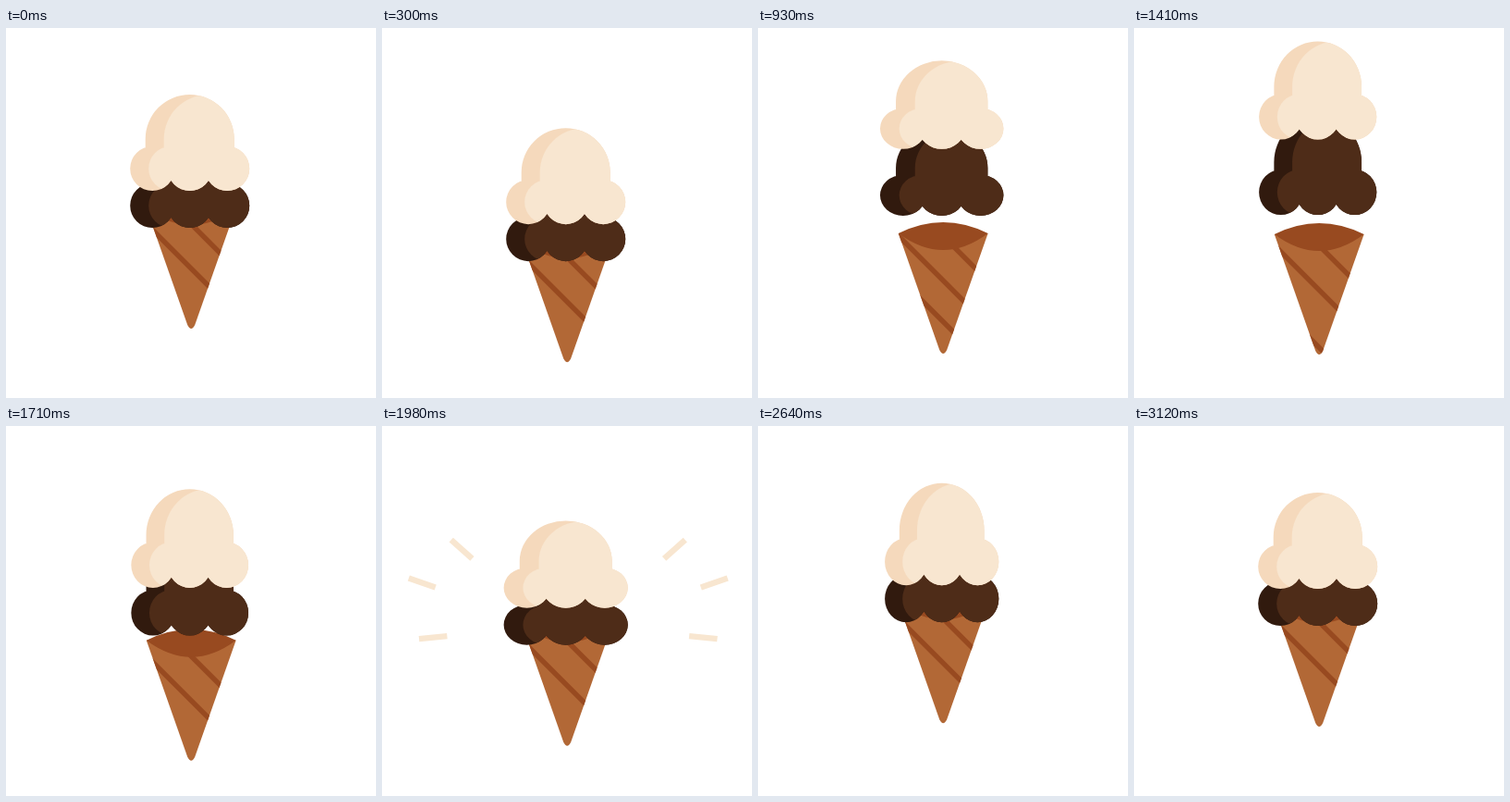
Recreate the animation shown at these times as an HTML page with a canvas. Size 400 px wide and 400 px high, loop 3180 ms.

```html
<!DOCTYPE html>
<html lang="en">
<head>
<meta charset="utf-8">
<title>Ice cream</title>
<style>
  html, body { margin: 0; width: 100%; height: 100%; overflow: hidden; background: #fff; }
  canvas { display: block; width: 400px; height: 400px; }
</style>
</head>
<body>
<canvas id="stage" width="400" height="400"></canvas>
<script>
const ctx = document.getElementById('stage').getContext('2d');
const LOOP = 3180, STEP = 30, LAST = 3120;
const LAUNCH = 660, LAND = 1815;

const VANILLA = { light: '#f8e6d0', shade: '#f5d9bc', rest: 149, height: 86, hang: 2.9 };
const CHOCOLATE = { light: '#4e2c18', shade: '#311a0e', rest: 109, height: 42, hang: 4.9 };
const WAFER = '#b26836', WAFER_DARK = '#984a20';

function ease(t, from, to) {
  const u = Math.min(1, Math.max(0, (t - from) / (to - from)));
  return u * u * (3 - 2 * u);
}

// A value that drifts by eased, possibly overlapping moves: [from, to, change]
const glide = (value, ...moves) => t =>
  moves.reduce((sum, [from, to, change]) => sum + change * ease(t, from, to), value);

const coneTip = glide(325,
  [0, 540, 62], [560, 785, -35], [1370, 1590, 11], [1632, 2432, -43], [2432, 3050, 5]);
const squash = glide(0,
  [400, 640, 0.145], [520, 1510, -0.17], [1800, 1930, 0.135], [1880, 2440, -0.178], [2560, 3120, 0.068]);
const swirl = glide(0, [690, 930, 1], [1030, 1650, -1]);
const rayHead = glide(60, [1790, 2010, -60]);
const rayTail = glide(60, [1835, 2150, -60]);

// Height above the resting place during the toss; a larger hang floats longer
function lift(t, { height, hang }) {
  const u = (t - LAUNCH) / (LAND - LAUNCH);
  return u > 0 && u < 1 ? height * (1 - Math.abs(2 * u - 1) ** hang) : 0;
}

function ball(path, x, y, r) {
  path.moveTo(x + r, y);
  path.arc(x, y, r, 0, Math.PI * 2);
}

const scoopBody = new Path2D();
ball(scoopBody, 0, -56, 48);
scoopBody.rect(-48, -56, 96, 32);
for (const x of [-40.5, 0, 40.5]) ball(scoopBody, x, -24, 24);

// Lit side, clipped by the body
const scoopLit = new Path2D();
ball(scoopLit, 20, -56, 48);
ball(scoopLit, -20.5, -24, 24);
scoopLit.rect(-28, -56, 100, 32);
scoopLit.rect(-20.5, -25, 90, 26);

const conePath = new Path2D('M-48.4-130L-4-4Q0 4 4-4L48.4-130Z');
const rimPath = new Path2D('M-48.4-130Q0-154 48.4-130Q0-94-48.4-130Z');

// Outer end and upward tilt in degrees of the rays on the left
const RAYS = [[72.5, 121, 42], [26, 163.5, 19], [37, 230.4, -5.7]];
const MIRROR = 402.5;

function line(x1, y1, x2, y2) {
  ctx.beginPath();
  ctx.moveTo(x1, y1);
  ctx.lineTo(x2, y2);
  ctx.stroke();
}

function drawRays(t) {
  const head = rayHead(t), tail = rayTail(t);
  if (tail - head < 0.3) return;
  ctx.strokeStyle = VANILLA.light;
  ctx.lineWidth = 6.4;
  for (const [x, y, tilt] of RAYS) {
    const dx = Math.cos(tilt * Math.PI / 180), dy = Math.sin(tilt * Math.PI / 180);
    const x1 = x + dx * head, x2 = x + dx * tail;
    const y1 = y + dy * head, y2 = y + dy * tail;
    line(x1, y1, x2, y2);
    line(MIRROR - x1, y1, MIRROR - x2, y2);
  }
}

function drawCone(t) {
  const u = swirl(t);
  ctx.save();
  ctx.translate(200.2, coneTip(t));
  ctx.fillStyle = WAFER;
  ctx.fill(conePath);
  ctx.save();
  ctx.clip(conePath);
  ctx.strokeStyle = WAFER_DARK;
  ctx.lineWidth = 5.5;
  for (const c of [-113 - 14 * u, -65 - 14 * u, 6 - 40.5 * u]) line(-80, c - 80, 80, c + 80);
  ctx.restore();
  ctx.fillStyle = WAFER_DARK;
  ctx.fill(rimPath);
  ctx.restore();
}

function drawScoop(t, scoop) {
  const k = squash(t);
  ctx.save();
  ctx.translate(198.7, coneTip(t) - scoop.rest - lift(t, scoop));
  ctx.scale(1 + k * (k > 0 ? 0.42 : 0.7), 1 - k);
  ctx.fillStyle = scoop.shade;
  ctx.fill(scoopBody);
  ctx.clip(scoopBody);
  ctx.fillStyle = scoop.light;
  ctx.fill(scoopLit);
  ctx.restore();
}

function draw(t) {
  ctx.fillStyle = '#fff';
  ctx.fillRect(0, 0, 400, 400);
  drawRays(t);
  drawCone(t);
  drawScoop(t, CHOCOLATE);
  drawScoop(t, VANILLA);
}

const start = performance.now();
function tick() {
  const t = (performance.now() - start) % LOOP;
  draw(Math.min(LAST, Math.floor(t / STEP) * STEP));
  requestAnimationFrame(tick);
}
tick();
</script>
</body>
</html>
```
